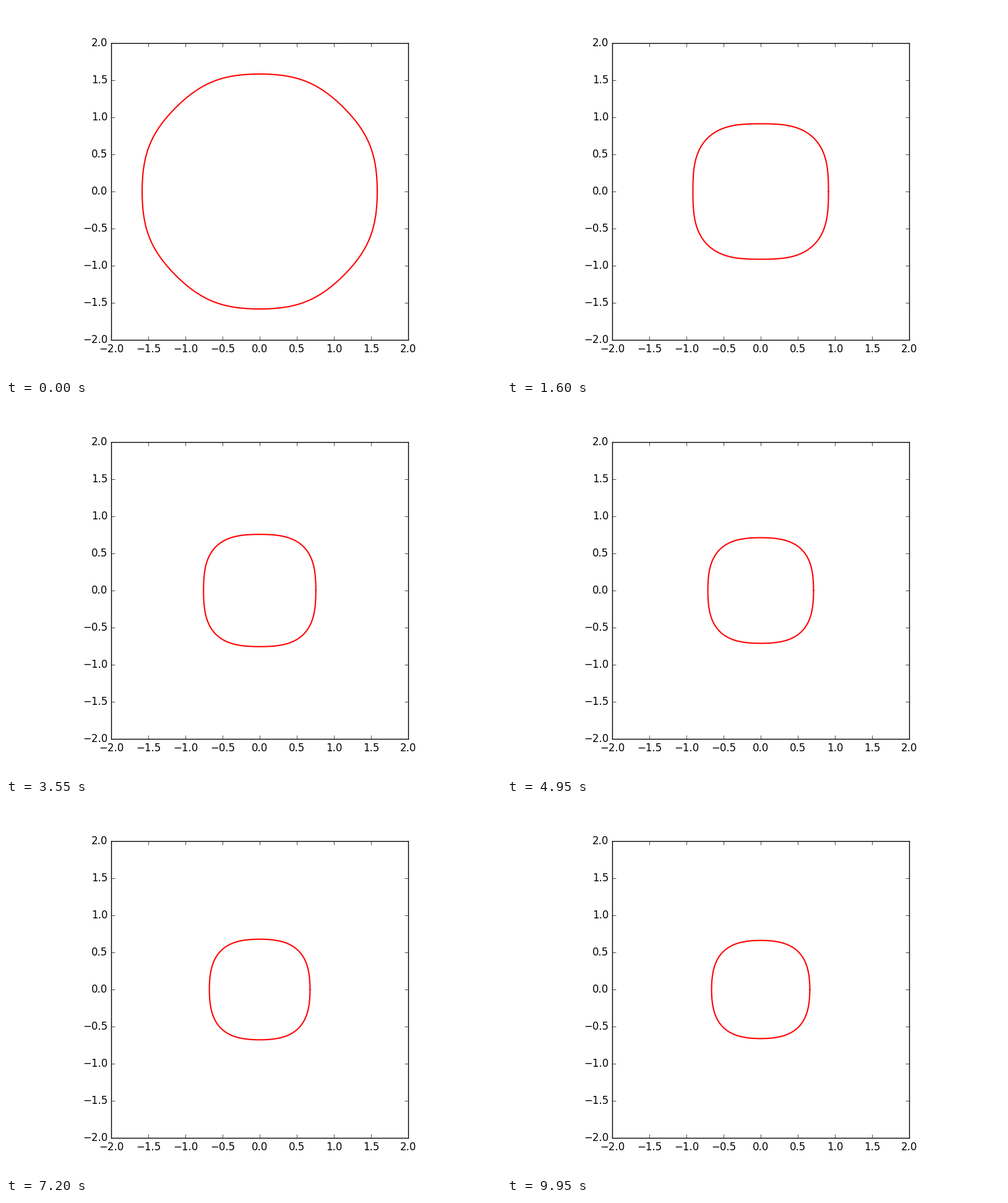
Animation of 800 by 600 pixels, one loop 10000 ms. Source, as a matplotlib script:

```python
import numpy as np
import matplotlib.pyplot as plt
from matplotlib.animation import FuncAnimation

FRAMES = 200
INTERVAL = 50

plt.style.use("classic")
plt.rcParams["font.family"] = "DejaVu Sans"

fig = plt.figure(figsize=(8, 6), dpi=100, facecolor="white")
ax = fig.add_subplot(111, aspect="equal")
ax.set_xlim(-2, 2)
ax.set_ylim(-2, 2)
ticks = np.arange(-2, 2.1, 0.5)
ax.set_xticks(ticks)
ax.set_yticks(ticks)

theta = np.linspace(0, 2 * np.pi, 401)
(curve,) = ax.plot([], [], color="red", lw=1.5)


def radius(step):
    """Radius over theta; 1/r^2 relaxes exponentially to its limit shape."""
    axis = 2.36 - 1.961 * np.exp(-0.0164 * step)
    square = 0.172 - 0.168 * np.exp(-step / 30)
    octagon = 0.0045 * np.exp(-step / 60)
    inverse = (axis
               - square * (1 - np.cos(4 * theta))
               - octagon * (1 - np.cos(8 * theta)))
    # the square term spans axis to diagonal
    return 1 / np.sqrt(inverse)


def update(step):
    r = radius(step)
    curve.set_data(r * np.cos(theta), r * np.sin(theta))
    return (curve,)


anim = FuncAnimation(fig, update, frames=FRAMES, interval=INTERVAL,
                     repeat=True, repeat_delay=0)

plt.show()
```
